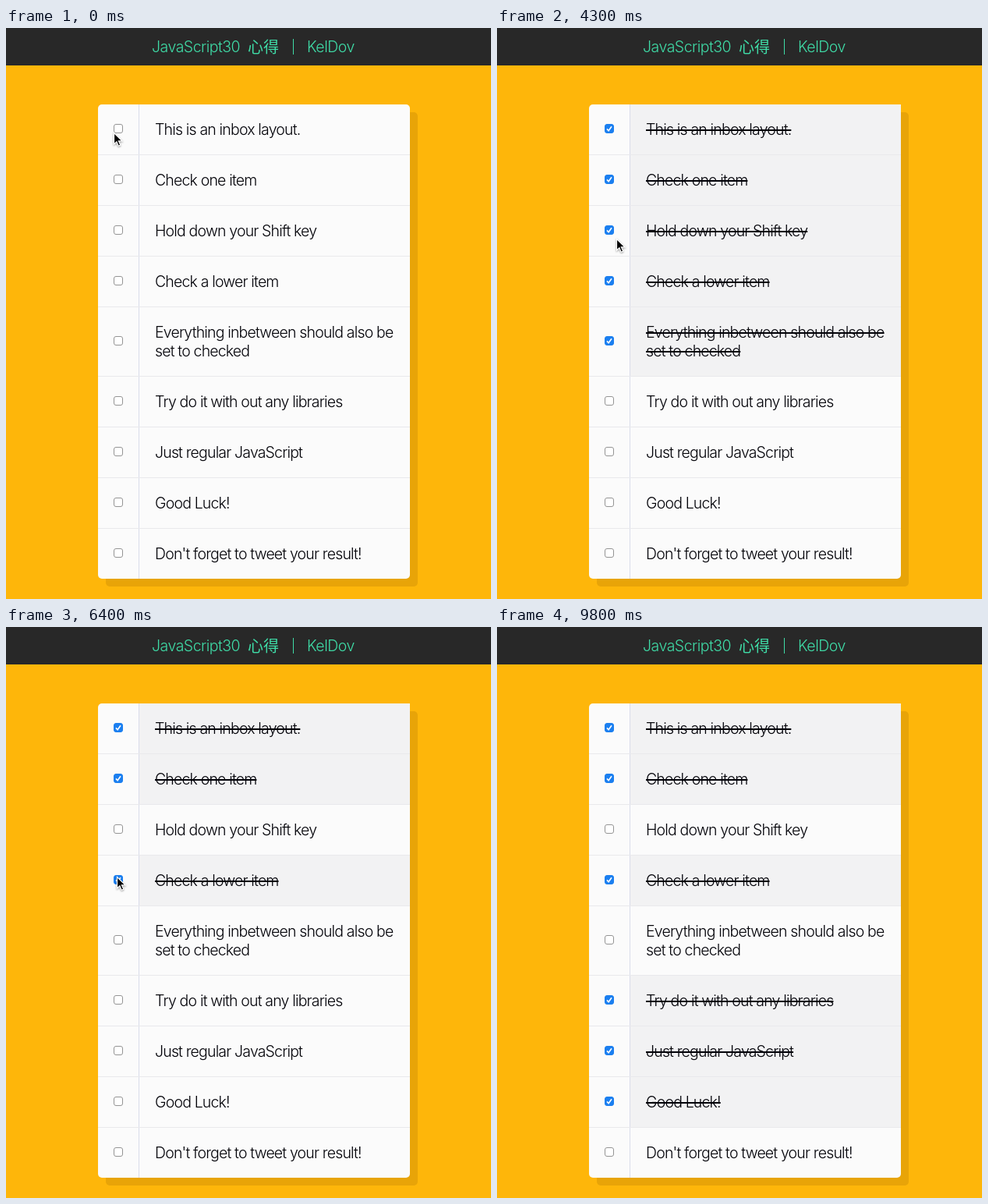
An HTML page that plays this animation: 622x732 px, repeating every 9.9 s.

```html
<!DOCTYPE html>
<html lang="en">
<head>
<meta charset="utf-8">
<title>Inbox checklist</title>
<style>
  html, body { margin: 0; width: 100%; height: 100%; overflow: hidden; }
  body {
    position: relative;
    background: #feb60a;
    color: #020208;
    font: 300 19.5px/24px Inter, "Liberation Sans", sans-serif;
    letter-spacing: -.83px;
  }
  header { position: absolute; inset: 0 0 auto; height: 48px; background: #282828; color: #3fdca7; }
  header span { position: absolute; top: 12px; white-space: nowrap; letter-spacing: -.5px; }
  header .cjk { font: 300 20px/24px "Noto Sans CJK TC", "Noto Sans CJK", sans-serif; letter-spacing: 0; }
  header i { position: absolute; left: 368px; top: 14px; width: 1.4px; height: 20px; background: currentColor; }
  .inbox {
    position: absolute; left: 118px; top: 98px; width: 400px; height: 608px;
    background: #fbfbfb; border-radius: 5px; box-shadow: 10px 10px #e8a408;
  }
  .item { position: relative; border-bottom: 1px solid #e9e9ec; }
  .item:last-child { border: 0; }
  .item p { margin: 0 0 0 52px; padding: 20px 0 20px 20px; border-left: 1px solid #d9dcea; white-space: pre; }
  .box {
    position: absolute; left: 20px; top: calc(50% - 7px); width: 12px; height: 12px;
    box-sizing: border-box; border: 1px solid #949494; border-radius: 3px; background: #fff;
  }
  .box svg { position: absolute; left: -1px; top: -1px; display: none; }
  .down .box { border-color: #666; background: #dcdcdc; }
  .done .box { border-color: #1b7ff0; background: #1b7ff0; }
  .done.down .box { border-color: #0c5fc0; background: #0c5fc0; }
  .done .box svg { display: block; }
  .done p { background: #f2f2f3; text-decoration: line-through 1.6px; }
  #cursor { position: absolute; left: -2px; top: -2px; overflow: visible; filter: drop-shadow(0 1px 1px #0006); }
</style>
</head>
<body>
<header>
  <span style="left:187px">JavaScript30</span>
  <span class="cjk" style="left:310px">心得</span>
  <i></i>
  <span style="left:386px">KelDov</span>
</header>
<div class="inbox"></div>
<svg id="cursor" width="16" height="22" viewBox="-2 -2 16 22">
  <path d="M.5.5V15L3.9 11.8 6.2 17.2 8.7 16.1 6.4 10.9H11Z" stroke="#fff" stroke-width="1.2"/>
</svg>
<script>
const LOOP = 9900, STEP = 100;

const labels = [
  "This is an inbox layout.",
  "Check one item",
  "Hold down your Shift key",
  "Check a lower item",
  "Everything inbetween should also be\nset to checked",
  "Try do it with out any libraries",
  "Just regular JavaScript",
  "Good Luck!",
  "Don't forget to tweet your result!"
];

// Pointer stops: time, x, y
const path = [
  [0, 138, 134], [1000, 138, 134], [1300, 142, 128], [2200, 142, 128],
  [3200, 143, 399], [3900, 143, 399], [4300, 153, 270], [4500, 143, 257],
  [4800, 143, 257], [5000, 143, 399], [5200, 143, 399], [5500, 142, 320],
  [6500, 142, 320], [7100, 144, 480], [8200, 144, 480], [8500, 143, 608],
  [8900, 143, 608], [9300, 330, 668], [9700, 590, 736], [LOOP, 590, 736]
];

// Clicks: press time, release time, first row, last row, new state
const clicks = [
  [1500, 1600, 0, 0, true],
  [3500, 3700, 0, 4, true],
  [4600, 4700, 2, 2, false],
  [5000, 5100, 4, 4, false],
  [5500, 5600, 3, 3, false],
  [6200, 6300, 3, 3, true],
  [7200, 8100, 5, 5, true],
  [8600, 8700, 5, 7, true]
];

const check = '<svg width="12" height="12"><path d="M3 6.4 5.1 8.8 9 3.2" fill="none" stroke="#fff" stroke-width="1.6"/></svg>';
const inbox = document.querySelector(".inbox");
const cursor = document.getElementById("cursor");

const items = labels.map(text => {
  const item = document.createElement("div");
  item.className = "item";
  item.innerHTML = `<span class="box">${check}</span><p></p>`;
  item.lastChild.textContent = text;
  inbox.append(item);
  return item;
});

const ease = u => u * u * (3 - 2 * u);

function pointer(t) {
  const i = path.findIndex(stop => stop[0] > t);
  const [t0, x0, y0] = path[i - 1], [t1, x1, y1] = path[i];
  const k = ease((t - t0) / (t1 - t0));
  return [x0 + (x1 - x0) * k, y0 + (y1 - y0) * k].map(Math.round);
}

function draw() {
  const t = Math.floor(performance.now() % LOOP / STEP) * STEP;
  const [x, y] = pointer(t);
  cursor.style.transform = `translate(${x}px, ${y}px)`;
  items.forEach((item, row) => {
    let done = false, down = false;
    for (const [press, release, first, last, state] of clicks) {
      if (t >= release && row >= first && row <= last) done = state;
      if (t >= press && t < release && row === last) down = true;
    }
    item.classList.toggle("done", done);
    item.classList.toggle("down", down);
  });
  requestAnimationFrame(draw);
}
draw();
</script>
</body>
</html>
```
